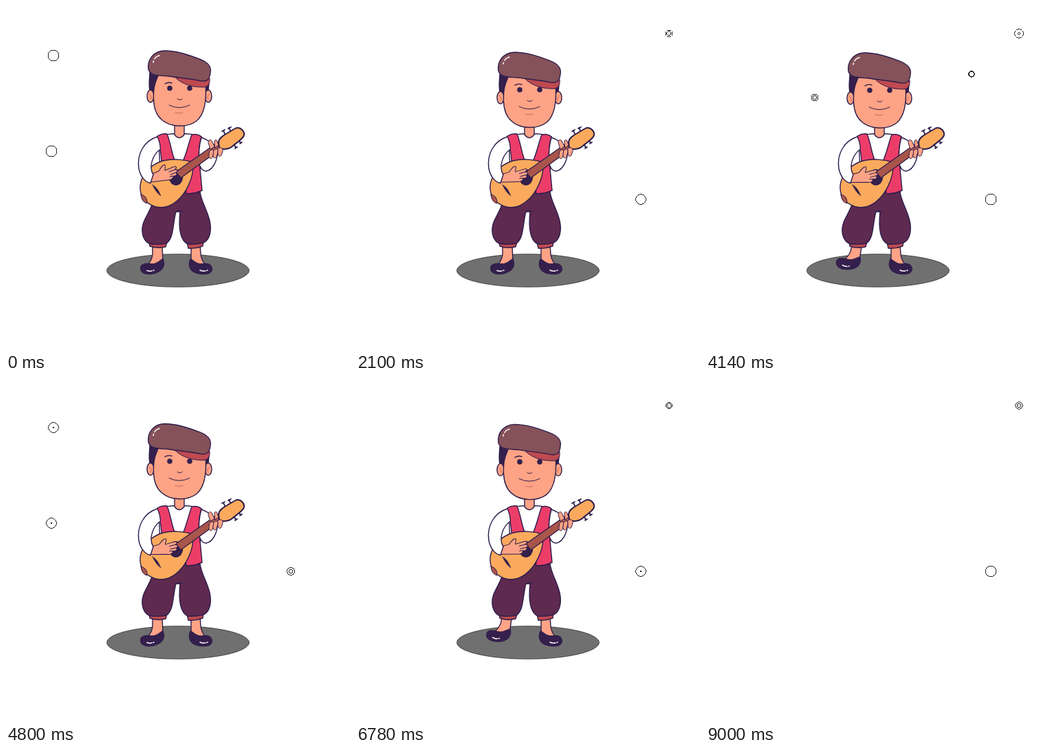
An HTML page that plays this animation: 500 by 500 pixels, repeating every 9030 ms.

```html
<!DOCTYPE html>
<html lang="en">
<head>
<meta charset="utf-8">
<title>Musician</title>
<style>
  html, body { margin: 0; width: 100%; height: 100%; overflow: hidden; background: #fff; }
  svg { display: block; width: 100vw; height: 100vh; }
  #man { stroke: #2e1d4b; stroke-width: 1.4; stroke-linejoin: round; stroke-linecap: round; }
  .skin { fill: #fea385; }
  .vest { fill: #ec3d69; }
  .dark { fill: #35204d; }
  .cuff { fill: #bf4a50; }
  .wood { fill: #fbaa5d; }
  .neck { fill: #a9554c; }
  .line { fill: none; }
  .thin { stroke-width: 1; }
  .shine { fill: none; stroke: #fff; stroke-width: 1.5; }
  #rings { fill: none; stroke: #111; stroke-width: .9; shape-rendering: crispEdges; }
</style>
</head>
<body>
<svg viewBox="0 0 500 500">
  <g id="man">
    <ellipse cx="250" cy="384.5" rx="103.5" ry="24" fill="#707070" stroke="#333" stroke-width=".8" shape-rendering="crispEdges"/>

    <g id="foot">
      <path class="skin" d="M213 346 L213 361 Q212 369 207 375 L216 381 L228 373 L227 346Z"/>
      <path class="dark" d="M196 379 C198 374 206 374 211 375 C220 376 225 368 228 368 C232 377 228 386 214 389 C203 391 194 388 196 379Z"/>
      <path class="shine" d="M205 384.5 Q209 386 212 385 M214 384.5 L215 384"/>
    </g>
    <path class="skin" d="M269 346 L269 373 L280 381 L289 375 Q284 369 283 361 L282 346Z"/>
    <path class="dark" d="M268 368 C264 377 267 387 281 389 C293 391 301 388 299 380 C297 374 290 374 285 375 C276 376 271 368 268 368Z"/>
    <path class="shine" d="M282 384 Q286 386 290 385 M292 384.5 L293 384"/>

    <path class="cuff" d="M208 343 L234 343 L232 350 Q220 353 209 349Z M263 343 L287 342 L286 349 Q276 353 265 352Z"/>
    <path fill="#5e2a50" d="M213 286 C207 305 197 312 198 328 C199 340 206 346 212 346 Q224 347 233 345 C244 338 242 318 247 299 L253 299 C251 318 252 340 264 346 Q276 347 287 344 C297 340 299 325 296 312 C292 295 284 285 282 270 L214 270Z"/>
    <path class="line thin" d="M247 299 Q254 296 257 299"/>

    <path fill="#fff" d="M222 190 C235 184 270 184 284 190 L281 270 L225 270Z"/>
    <path class="vest" d="M220 189 Q227 185 234 186 C240 200 240 213 246 226 L226 228 C226 210 222 203 220 189Z"/>
    <path class="vest" d="M270 187 Q278 185 284 190 C279 207 280 219 282 236 L285 268 Q275 273 262 273 L257 226 C263 213 265 200 270 187Z"/>
    <path class="skin" d="M245 170 L245 187 Q252 196 259 187 L259 170Z"/>
    <path id="sleeve" fill="#fff"/>

    <path class="wood" d="M271 227 C275 245 262 280 236 291 C218 297 196 286 195 265 C194 250 207 231 228 225 C245 221 262 224 271 227Z"/>
    <path class="neck thin" d="M196 274 Q206 276 205 287 Q197 285 196 274Z"/>
    <path class="dark" d="M213 260 Q220 263 225 276 Q218 271 213 260Z" stroke-width=".6"/>
    <ellipse class="dark" cx="247" cy="249" rx="9.5" ry="11"/>
    <path class="neck" d="M247 241 L308 198 L313 207 L254 250Z"/>
    <path class="line" stroke-width="1.8" d="M318 186 L316 181 M314 182 L318 180 M326 181 L324 177 M323 178 L327 176 M332 202 L334 206 M333 207 L336 205 M339 196 L341 199 M340 200 L343 198"/>
    <path class="wood" stroke-width="2" d="M309 199 C309 193 313 190 318 187 L334 177.500 C341 175 348 183 345.500 189 C343 194 336 198 329 204 C323 209 313 209 310 206Z"/>

    <g id="fret" class="skin thin">
      <path d="M297 208 L294 199 C294 195 297 193 299 196 L303 204Z"/>
      <path d="M303 199 C302 194 306 193 307 197 L309 202 L304 206Z"/>
      <path d="M296 211 C300 207 303 209 302 213 L300 220 C298 224 294 221 295 217Z"/>
      <path d="M302 210 C306 206 309 208 308 212 L306 219 C304 223 300 220 301 216Z"/>
      <path d="M308 207 C312 204 316 207 315 211 L313 217 C311 220 307 218 308 213Z"/>
    </g>
    <path id="hand" class="skin thin" d="M210 245 L222 240 C225 235 228 230 231 231 C233 233 230 237 231 239 L243 234 C248 232 249 235 245 238 C250 237 250 241 247 242 C250 244 247 248 243 247 C244 251 240 253 235 253 L210 256Z M245 238 L237 241 M247 242 L239 245 M243 247 L238 248"/>
    <path fill="#fff" d="M220 190 C200 196 190 216 193 236 C195 247 202 256 210 257.500 L214 245 C207 234 213 216 224.500 208 Q224 198 220 190Z"/>

    <g id="head">
      <path class="dark" d="M209 97 L224 100 L217 124 L209 122 C207 112 209 105 209 97Z M288 108 L295 112 L294 123 L289 122Z"/>
      <ellipse class="skin" cx="210" cy="131" rx="5" ry="9"/>
      <ellipse class="skin" cx="294" cy="131" rx="5" ry="9"/>
      <path class="skin" d="M222 99 C216 113 214 119 214.500 136 C215 150 219 159 226 165 C239 177 264 177 277 167 C289 157 292 137 290 111Z"/>
      <path class="line thin" stroke="#c9695e" d="M208 128 Q212 130 211 135 M296 128 Q292 130 293 135 M246 155 Q251 157 257 155"/>
      <path class="cuff thin" d="M246 102 L296 105 C297 113 293 118 287 118 C270 118 257 114 246 104Z"/>
      <path fill="#85525a" d="M207 92 C205 78 214 66 230 65 C248 65 265 71 281 77 C294 82 299 88 297 97 C296 107 292 110 284 109 C268 106 250 104 236 102 C222 101 210 102 207 92Z"/>
      <path class="shine" d="M214 82 L214.5 80 M216 77 Q218 73 223 72"/>
      <path class="line" d="M231 113 Q236 110 241 112"/>
      <g id="eyes" class="dark" stroke="none">
        <circle cx="238" cy="119.5" r="3.8"/>
        <circle cx="267" cy="119.5" r="3.8"/>
      </g>
      <path class="line thin" d="M249 135 Q253 138 256 135 M237 144 Q252 151.500 267 144"/>
    </g>
  </g>
  <g id="rings"></g>
</svg>
<script>
const LOOP = 9030, CYCLE = 2325, LIFE = 760;
const $ = id => document.getElementById(id);
const clamp = v => Math.max(0, Math.min(1, v));
const ease = v => (v = clamp(v), v * v * (3 - 2 * v));
const wave = (t, period) => (1 - Math.cos(2 * Math.PI * t / period)) / 2;

// x, y, start of hollowing, time held as a disc, first cycle
const sparks = [
  [69, 72, 19, 20, 0], [66, 211, 19, 20, 0], [428, 198, 370, 0, 1],
  [342, 238, 430, 0, 0], [124, 271, 640, 0, 0], [277, 27, 700, 0, 0],
  [386, 99, 1110, 340, 0], [158, 133, 1260, 0, 0],
  [455, 40, 1500, 0, 0], [414, 281, 2000, 230, 0]
];

function drawRings(t) {
  let out = '';
  for (const [x, y, start, hold, first] of sparks) {
    for (let k = first; k < 4; k++) {
      const age = t - start - k * CYCLE;
      if (age < -hold || age > LIFE) continue;
      const half = 4 * (1 - clamp(age / LIFE));
      for (const r of [4 + half, 4 - half])
        if (r > .4) out += `<circle cx="${x}" cy="${y}" r="${r}"/>`;
    }
  }
  $('rings').innerHTML = out;
}

function draw(t) {
  const phase = t % CYCLE;
  const move = (id, value) => $(id).setAttribute('transform', value);

  $('man').style.display = t < 9000 ? '' : 'none';
  move('head', `translate(0 ${3 * Math.sqrt(wave(t, 930))})`);

  const beat = t % 900 / 900;
  const lift = beat > .37 && beat < .79 ? Math.sin(Math.PI * (beat - .37) / .42) : 0;
  move('foot', `translate(0 ${-4 * lift}) rotate(${11 * lift} 222 347)`);
  move('hand', `rotate(${7 * wave(t, 333)} 206 246)`);

  const slide = ease((phase - 450) / 200) - ease((phase - 900) / 200);
  move('fret', `translate(${-12 * slide} ${8 * slide})`);
  $('sleeve').setAttribute('d',
    `M284 191 C${295 - 3 * slide} 195 ${302 - 8 * slide} 201 ${306 - 8 * slide} 208
     C${310 - 8 * slide} 217 ${303 - 3 * slide} 238 291 240 Q284 240 281 230 Q279 208 284 191Z`);

  const blink = clamp(1 - Math.abs(phase - 850) / 110);
  move('eyes', `translate(0 ${119.5 * blink * .9}) scale(1 ${1 - .9 * blink})`);
  drawRings(t);
}

const begin = performance.now();
function tick() {
  draw((performance.now() - begin) % LOOP);
  requestAnimationFrame(tick);
}
tick();
</script>
</body>
</html>
```
